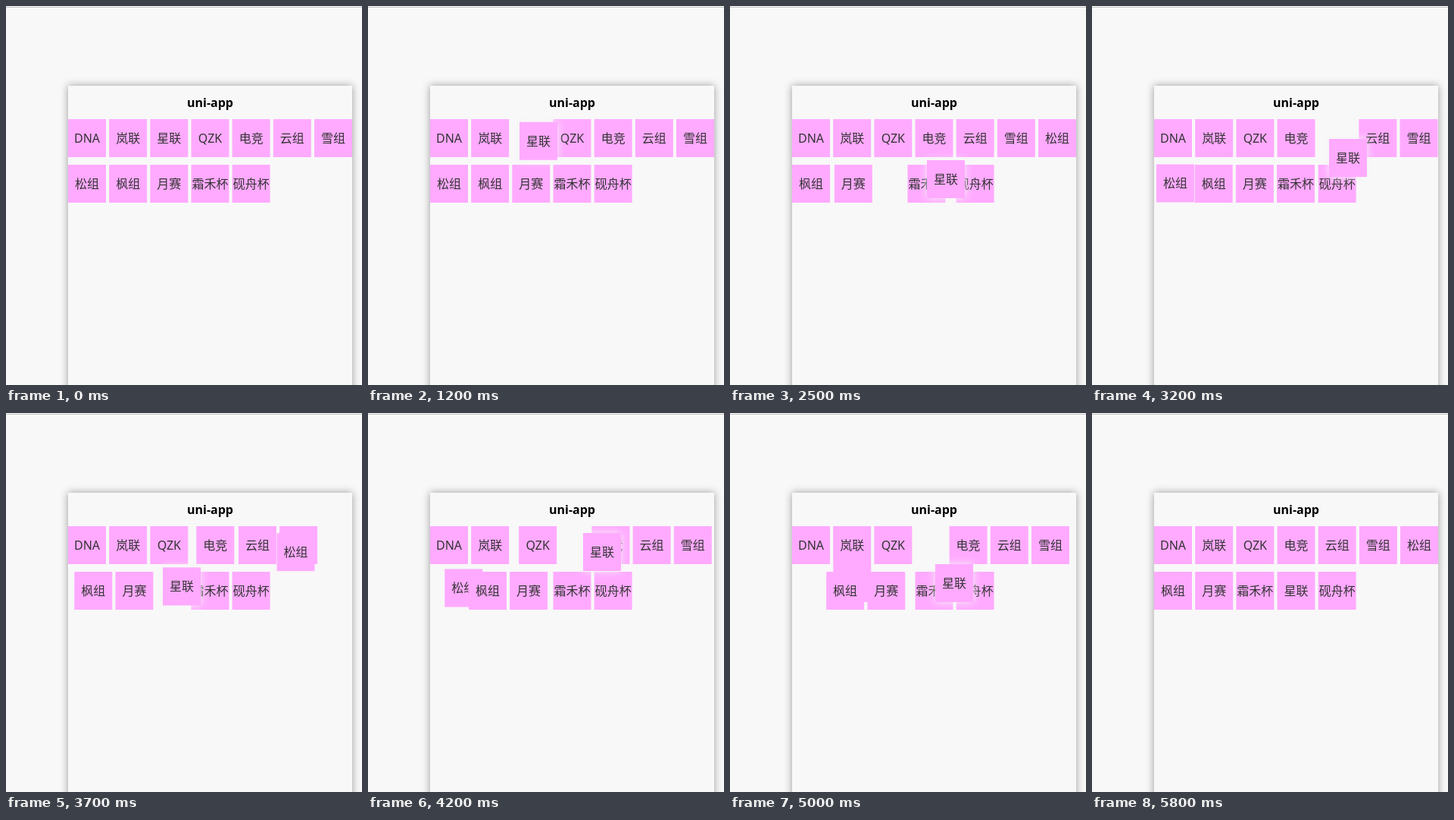
An HTML page for the animation above (8.7 s loop, 470 px wide and 499 px high).

```html
<!DOCTYPE html>
<html lang="zh-CN">
<head>
<meta charset="utf-8">
<title>Drag to sort</title>
<style>
  html, body { margin: 0; width: 100%; height: 100%; overflow: hidden; background: #f8f8f8; }
  body { position: relative; font: 16px "Noto Sans", "Noto Sans CJK SC", "Noto Sans CJK", sans-serif; }
  .rule { position: absolute; top: 1px; width: 100%; height: 1px; background: #c0c0c0; }
  .phone {
    position: absolute; left: 82px; top: 105px; width: 375px; height: 420px;
    background: #f8f8f8; box-shadow: 0 0 10px #999;
  }
  h1 { margin: 0; font-size: 16px; font-weight: 700; line-height: 44px; text-align: center; color: #000; }
  .tile {
    position: absolute; left: 0; top: 44px; width: 50px; height: 50px;
    line-height: 50px; text-align: center; white-space: nowrap;
    color: #333; background: #faf;
  }
  .held { z-index: 1; box-shadow: 0 0 10px #f4f4f4; }
</style>
</head>
<body>
<div class="rule"></div>
<div class="phone"><h1>uni-app</h1></div>
<script>
const LOOP = 8700, STEP = 100, SHIFT = 400, SAMPLE = 10;
const COLUMNS = 7, SIZE = 50, PITCH_X = 325 / 6, PITCH_Y = 60;
const HELD = 2, GRAB = 1100, RELEASE = 5600, GRIP_Y = 7;
const labels = ['DNA', '岚联', '星联', 'QZK', '电竞', '云组', '雪组',
  '松组', '枫组', '月赛', '霜禾杯', '砚舟杯'];

const mix = (a, b, k) => a.map((v, i) => v + (b[i] - v) * k);
const slotPoint = i => [i % COLUMNS * PITCH_X, Math.floor(i / COLUMNS) * PITCH_Y];

// Turning points of the drag: [time, x, y] from the first slot
const path = [
  [GRAB, ...slotPoint(HELD)], [1500, 147, 15], [1800, 115, 46], [2000, 71, 51],
  [2350, 140, 81], [2500, 178, 54], [2800, 216, 45], [3200, 231, 26],
  [3500, 150, 55], [3820, 110, 54], [4200, 202, 9], [4500, 148, 55],
  [4700, 150, 55], [4870, 185, 30], [5000, 189, 50], [RELEASE, 163, 60]
];

function dragPoint(t) {
  const next = path.findIndex(key => key[0] > t);
  const a = path[next - 1], b = path[next];
  return mix(a, b, (t - a[0]) / (b[0] - a[0])).slice(1);
}

// Slot under the grip, or the previous one while it crosses a gap.
function slotUnder([x, y], previous) {
  const gripY = y + GRIP_Y;
  if (x % PITCH_X >= SIZE || gripY % PITCH_Y >= SIZE) return previous;
  return Math.floor(gripY / PITCH_Y) * COLUMNS + Math.floor(x / PITCH_X);
}

const moves = [];
let hover = HELD;
for (let time = GRAB + SAMPLE; time < RELEASE; time += SAMPLE) {
  const slot = slotUnder(dragPoint(time), hover);
  if (slot !== hover) moves.push({ time, slot });
  hover = slot;
}

// cubic-bezier(.25, .1, .25, 1)
function ease(x) {
  if (x <= 0) return 0;
  if (x >= 1) return 1;
  const curve = (p, q, s) => 3 * p * s * (1 - s) ** 2 + 3 * q * s * s * (1 - s) + s ** 3;
  let low = 0, high = 1;
  for (let i = 0; i < 20; i++) {
    const mid = (low + high) / 2;
    if (curve(.25, .25, mid) < x) low = mid; else high = mid;
  }
  return curve(.1, 1, low);
}

function heldPoint(t) {
  if (t < GRAB) return slotPoint(HELD);
  return t < RELEASE ? dragPoint(t) : slotPoint(hover);
}

// Tiles close up behind the held one and make room where it hovers.
function slotOf(tile, gap) {
  const rank = tile > HELD ? tile - 1 : tile;
  return rank >= gap ? rank + 1 : rank;
}

function restingPoint(tile, t) {
  let slot = tile, from = slotPoint(tile), start = 0;
  const at = time => mix(from, slotPoint(slot), ease((time - start) / SHIFT));
  for (const move of moves) {
    if (move.time > t) break;
    const target = slotOf(tile, move.slot);
    if (target === slot) continue;
    from = at(move.time);
    slot = target;
    start = move.time;
  }
  return at(t);
}

const phone = document.querySelector('.phone');
const tiles = labels.map(label => {
  const tile = document.createElement('div');
  tile.className = 'tile';
  tile.textContent = label;
  return phone.appendChild(tile);
});

function draw(now) {
  const t = Math.floor(now % LOOP / STEP) * STEP;
  tiles.forEach((tile, i) => {
    const [x, y] = i === HELD ? heldPoint(t) : restingPoint(i, t);
    tile.style.transform = `translate(${x}px, ${y}px)`;
  });
  tiles[HELD].classList.toggle('held', t > GRAB && t < RELEASE);
}

const origin = performance.now();
function tick() {
  draw(performance.now() - origin);
  requestAnimationFrame(tick);
}
tick();
</script>
</body>
</html>
```
